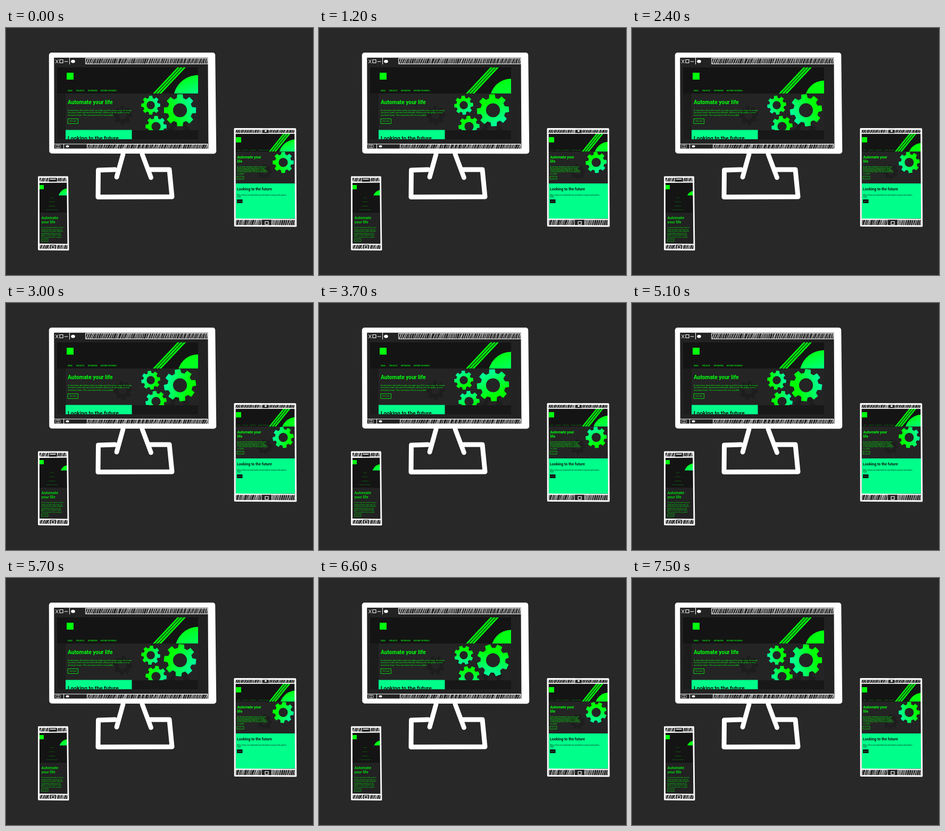
Recreate the animation shown at these times as an HTML page with a canvas. Size 577 by 464 pixels, loop 7600 ms.

```html
<!DOCTYPE html>
<html lang="en">
<head>
<meta charset="utf-8">
<title>Responsive page on three devices</title>
<style>
html, body { margin: 0; width: 100%; height: 100%; overflow: hidden; background: #282828; }
canvas { display: block; }
</style>
</head>
<body>
<canvas id="stage" width="577" height="464"></canvas>
<script>
const c = document.getElementById('stage').getContext('2d');
const LOOP = 7600, STEP = 100, TURN = 5000, LEAD = 0.38;
const GREEN = '#00ff0c', DIM = '#00d80c', MINT = '#00ff8a', INK = '#141414', HERO = '#242424', BG = '#282828';
let seed;

function rand() {
  seed = (seed * 16807) % 2147483647;
  return seed / 2147483647;
}

function box(x0, y0, x1, y1, color) {
  c.fillStyle = color;
  c.fillRect(x0, y0, x1 - x0, y1 - y0);
}

function frame(x0, y0, x1, y1, color, width) {
  c.strokeStyle = color;
  c.lineWidth = width;
  c.strokeRect(x0, y0, x1 - x0, y1 - y0);
}

function line(points, width, color = '#fff', closed = false) {
  c.beginPath();
  points.forEach(([x, y]) => c.lineTo(x, y));
  if (closed) c.closePath();
  c.strokeStyle = color;
  c.lineWidth = width;
  c.stroke();
}

function oval(x, y, rx, ry) {
  c.beginPath();
  c.ellipse(x, y, rx, ry, 0, 0, 7);
  c.fillStyle = '#fff';
  c.fill();
}

function clipped(x0, y0, x1, y1, draw) {
  c.save();
  c.beginPath();
  c.rect(x0, y0, x1 - x0, y1 - y0);
  c.clip();
  draw();
  c.restore();
}

function text(lines, x, y, size, leading, color = GREEN, weight = 400, align = 'left') {
  c.font = `${weight} ${size}px Roboto, "Open Sans", sans-serif`;
  c.textAlign = align;
  c.fillStyle = color;
  lines.forEach((s, i) => c.fillText(s, x, y + i * leading));
}

function gear(x, y, r, angle, dark) {
  c.save();
  c.translate(x, y);
  c.rotate(angle);
  const gx = r * Math.cos(LEAD), gy = -r * Math.sin(LEAD);
  const fill = c.createLinearGradient(-gx, -gy, gx, gy);
  fill.addColorStop(0.2, '#00ff00');
  fill.addColorStop(0.95, '#00ff9c');
  c.beginPath();
  for (let i = 0; i < 8; i++) {
    const mid = i * Math.PI / 4;
    for (const [d, k] of [[-0.26, 0.77], [-0.17, 1], [0.17, 1], [0.26, 0.77]]) {
      c.lineTo(r * k * Math.cos(mid + d), r * k * Math.sin(mid + d));
    }
  }
  c.closePath();
  c.moveTo(r * 0.43, 0);
  c.arc(0, 0, r * 0.43, 0, 7);
  c.fillStyle = dark ? '#1d1d1d' : fill;
  c.fill('evenodd');
  c.restore();
}

function stripes(x0, y0, x1, y1, gap, width) {
  for (let i = -1; i < 2; i++) {
    line([[x0 + i * gap, y0], [x1 + i * gap, y1]], width, GREEN);
  }
}

// Disc behind the corner of the header; it shrinks and grows.
function disc(x, y, small, large, pulse) {
  const r = small + (large - small) * pulse;
  const fill = c.createLinearGradient(x - r * 0.5, y - r, x - r * 0.2, y - r * 0.2);
  fill.addColorStop(0, GREEN);
  fill.addColorStop(1, `rgb(0,255,${Math.round(12 + 125 * pulse)})`);
  c.beginPath();
  c.arc(x, y, r, 0, 7);
  c.fillStyle = fill;
  c.fill();
}

function hatch(x0, y0, x1, y1, gap) {
  clipped(x0, y0, x1, y1, () => {
    for (let x = x0 - 2; x < x1; x += gap * (0.75 + rand() * 0.5)) {
      const lean = 2 + rand() * 3;
      line([[x, y1], [x + lean, y0]], 0.7 + rand() * 0.6, '#ddd');
    }
  });
  frame(x0, y0, x1, y1, '#fff', 1);
}

function monitor(angle, pulse) {
  box(86, 50, 388, 230, '#222');
  clipped(96, 74, 361, 209, () => {
    box(96, 74, 361, 123, INK);
    box(96, 123, 112, 209, '#1c1c1c');
    box(112, 123, 361, 192, HERO);
    box(236, 192, 361, 209, '#181818');
    box(112, 191.5, 236.5, 209, MINT);
    text(['Looking to the future'], 116, 211, 10.2, 0, INK, 700);
  });
  clipped(96, 74, 361, 123, () => {
    stripes(283, 124, 331, 73, 5.8, 3);
    disc(361, 135, 36, 47, pulse);
  });
  box(114, 84, 127, 97, GREEN);
  [['IDEAS', 116], ['PROJECTS', 132], ['INTERVIEWS', 154], ['BEYOND THE WORLD', 178]]
    .forEach(([s, x]) => text([s], x, 119, 3.1, 0, GREEN, 500));

  clipped(112, 123, 361, 192, () => {
    gear(219, 164, 18, angle, true);
    gear(325, 190, 20, angle, true);
    gear(272, 145, 18, angle);
    gear(282, 185, 20, angle);
    gear(327, 154.5, 30.5, angle);
  });
  text(['Automate your life'], 116, 143, 10.2, 0, GREEN, 700);
  text(['A voto have the better tools to make your life more easy. So many',
    'services under demand and default, delivery for all globe, a very',
    'inclusive team. The consumer this is our public.'], 116, 155.5, 4.15, 4.8);
  frame(116.5, 170.5, 135.5, 179.5, GREEN, 0.8);
  text(['Get now'], 126, 176.4, 3.5, 0, GREEN, 400, 'center');

  // window controls and bars
  line([[93.5, 59.5], [98, 66]], 1);
  line([[98, 59.5], [93.5, 66]], 1);
  frame(101, 59.5, 107, 65.5, '#fff', 1.1);
  line([[110, 63], [116, 63]], 1.2);
  line([[119.5, 56], [119.5, 68]], 1);
  oval(126, 62.7, 3.8, 3);
  hatch(150, 57, 379, 67.5, 3.3);
  line([[91, 218], [379, 218]], 1);
  frame(94, 220, 102, 225, '#ddd', 0.8);
  line([[98, 220], [98, 225]], 0.8);
  line([[108.5, 218], [108.5, 227]], 1);
  oval(115.5, 222.3, 3, 2);
  hatch(153, 218.5, 379, 227.5, 3.3);

  line([[85.5, 51], [388.5, 51], [390.5, 231.5], [86, 231]], 9.5, '#fff', true);
  line([[384, 53], [385, 229]], 9);
  line([[205, 266], [173.5, 267], [173, 317.5], [312, 317], [307, 266], [268, 266]], 9);
  line([[220, 237], [208, 280]], 8.8);
  line([[256, 237], [272.5, 281]], 8.8);
}

function tablet(angle, pulse) {
  box(430, 189, 544, 372, '#222');
  box(432, 198, 543, 232, INK);
  box(432, 232, 543, 292, HERO);
  box(432, 292, 543, 358, MINT);
  clipped(432, 198, 543, 232, () => {
    stripes(500, 233, 529, 197, 5, 2.6);
    disc(545, 242, 26, 33, pulse);
  });
  box(432, 205, 442, 215, GREEN);
  [['IDEAS', 435], ['PROJECTS', 445], ['INTERVIEWS', 458], ['BEYOND THE WORLD', 474]]
    .forEach(([s, x]) => text([s], x, 229.5, 2.1, 0, GREEN));
  clipped(432, 232, 543, 292, () => {
    gear(486, 270, 14, angle, true);
    gear(521, 252.5, 20, angle);
  });
  text(['Automate your', 'life'], 434.5, 245, 6.8, 8.2, GREEN, 700);
  text(['A voto have the better tools to make your',
    'life more easy. So many services under',
    'demand and default, delivery for all globe,',
    'a very inclusive team. The consumer this is',
    'our public.'], 434.5, 261.5, 3, 3.3);
  frame(434.5, 278.5, 447, 284, GREEN, 0.6);
  text(['Get now'], 440.7, 282, 2.3, 0, GREEN, 400, 'center');
  text(['Looking to the future'], 434, 304.5, 7, 0, INK, 700);
  text(['Many of these are created with care and made for everyone with a plan to',
    'begin.'], 434.5, 315, 2.85, 3.4, INK);
  box(434, 322, 444.5, 329, INK);
  text(['See all'], 439.2, 326.4, 2.4, 0, MINT, 400, 'center');

  hatch(431, 189, 481, 197.5, 3.2);
  hatch(495, 189, 544, 197.5, 3.2);
  oval(488, 193.5, 1.8, 1.8);
  hatch(431, 360, 480, 372, 3.2);
  hatch(500, 360, 544, 372, 3.2);
  frame(487, 363.5, 493, 369, '#fff', 1.2);
  line([[430, 189.5], [543.8, 190], [544.8, 372], [430.3, 371.5]], 3, '#fff', true);
  line([[431, 198], [543, 198]], 1.4);
  line([[431, 359], [544, 359.5]], 2);
}

function phone(pulse) {
  box(61, 280, 117, 416, '#222');
  box(63, 290, 116, 347, INK);
  box(63, 347, 116, 405, '#222');
  clipped(63, 290, 116, 314.5, () => disc(117, 320, 14, 19, pulse));
  box(63, 295, 71, 303, GREEN);
  text(['IDEAS', 'PROJECTS', 'INTERVIEWS', 'BEYOND THE WORLD'], 86.5, 319, 2.2, 7.8, DIM, 400, 'center');
  text(['Automate', 'your life'], 66.5, 358.5, 7.2, 8.6, DIM, 700);
  text(['A voto have the better tools to', 'make your life more easy. So',
    'many services under demand', 'and default, delivery for all',
    'globe, a very inclusive team.', 'The consumer this is public.'], 66.5, 376, 3.1, 3.5, DIM);
  frame(67, 396, 79, 401, DIM, 0.6);
  text(['Get now'], 73, 399.3, 2.2, 0, DIM, 400, 'center');

  hatch(62, 280, 80, 289, 2.8);
  hatch(97, 280, 116, 289, 2.8);
  line([[83, 284], [93, 284]], 1.4);
  hatch(62, 407, 82, 416, 2.8);
  hatch(95, 407, 117, 416, 2.8);
  frame(85.5, 409, 91, 414, '#fff', 1.2);
  line([[61.5, 280], [115.5, 280], [117, 416.5], [61.5, 416]], 2.8, '#fff', true);
  line([[62, 290], [116, 289.5]], 1.8);
  line([[62, 406], [117, 406.5]], 2);
}

function draw(now) {
  const t = Math.floor((now % LOOP) / STEP) * STEP;
  const angle = t / TURN * 2 * Math.PI;
  const pulse = (1 + Math.cos(angle + LEAD)) / 2;
  seed = 4242;
  c.lineJoin = c.lineCap = 'round';
  box(0, 0, 577, 464, BG);
  monitor(angle, pulse);
  tablet(angle, pulse);
  phone(pulse);
}

const start = performance.now();
function tick() {
  draw(performance.now() - start);
  requestAnimationFrame(tick);
}
tick();
</script>
</body>
</html>
```
